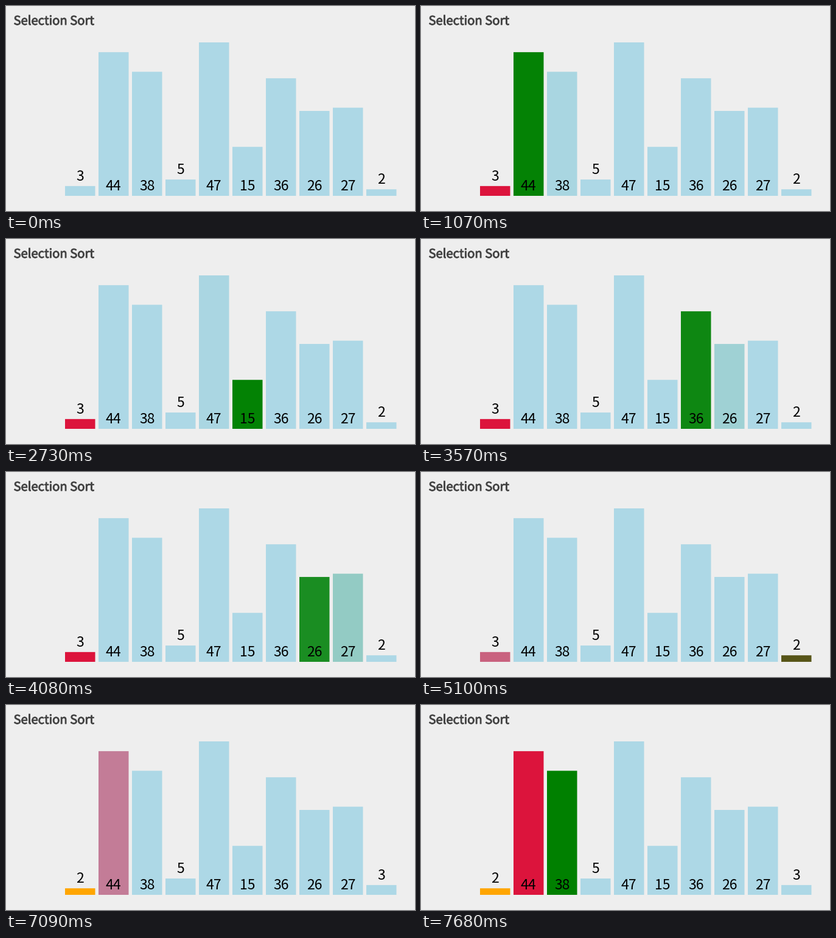
Write a matplotlib script that moves like this. It is 672 px wide and 338 px high and loops after 8 s.

```python
import math

import matplotlib.pyplot as plt
from matplotlib.animation import FuncAnimation
from matplotlib.colors import to_rgb
from matplotlib.patches import Rectangle
from matplotlib.patheffects import withStroke

W, H, DPI = 672, 338, 64
LOOP, STEP = 8000, 20
VALUES = [3, 44, 38, 5, 47, 15, 36, 26, 27, 2]
LEFT, PITCH, BAR_W, BASE = 97, 55, 49.5, 313
UNIT = 253 / 47
FONT = "Noto Sans CJK JP"

BLUE, GREEN, RED, ORANGE = map(to_rgb, ("lightblue", "green", "crimson", "orange"))

# Algorithm steps are evenly spaced and each one eases over FADE ms.
FIRST, GAP, FADE = 44, 496, 200
# The picture refreshes on a coarse clock.
TICK, PHASE = 46.26, 5

LAST = len(VALUES) - 1
SWAP = LAST + 3


def build_steps():
    """Colour changes as (step, bar, new colour)."""
    steps = [(0, 0, RED)]
    for j in range(1, LAST + 1):
        steps.append((j, j, GREEN))
        if j < LAST:
            steps.append((j + 1, j, BLUE))
    steps += [(LAST + 1, 0, BLUE), (LAST + 1, LAST, RED)]
    steps += [(LAST + 2, 0, RED)]
    steps += [(SWAP + 1, 0, BLUE), (SWAP + 1, LAST, ORANGE)]
    steps += [(SWAP + 2, 1, RED), (SWAP + 3, 2, GREEN)]
    return sorted(steps, key=lambda s: s[0])


STEPS = build_steps()


def progress(step, t):
    """Cubic ease in and out for one algorithm step."""
    p = min(max((t - FIRST - GAP * step) / FADE, 0), 1)
    return 4 * p ** 3 if p < 0.5 else 1 - 4 * (1 - p) ** 3


def mix(a, b, p):
    return tuple(u + (v - u) * p for u, v in zip(a, b))


def px(size):
    return size * 72 / DPI


fig = plt.figure(figsize=(W / DPI, H / DPI), dpi=DPI, facecolor="#eeeeee")
ax = fig.add_axes([0, 0, 1, 1])
ax.set_xlim(0, W)
ax.set_ylim(H, 0)
ax.axis("off")

ax.text(12.5, 31, "Selection Sort", family=FONT, size=px(20.2), color="#444444",
        va="baseline", path_effects=[withStroke(linewidth=px(0.9), foreground="#444444")])

bars, labels = [], []
for i, value in enumerate(VALUES):
    height = value * UNIT
    top = BASE - height
    bar = Rectangle((LEFT + PITCH * i, top), BAR_W, height, lw=0, fc=BLUE,
                    snap=False, zorder=2 * i + 2)
    bars.append(ax.add_patch(bar))
    baseline = (top if height < 40 else BASE) - 9
    labels.append(ax.text(LEFT + PITCH * i + BAR_W / 2, baseline, str(value),
                          family=FONT, size=px(23), color="black", ha="center",
                          va="baseline", zorder=2 * i + 3))


def place(i, slot):
    x = LEFT + PITCH * slot
    bars[i].set_x(x)
    labels[i].set_x(x + BAR_W / 2)


def draw(frame):
    ms = frame * STEP + STEP / 2
    t = PHASE + TICK * math.floor((ms - PHASE) / TICK) + 3
    colors = [BLUE] * len(VALUES)
    for step, i, color in STEPS:
        colors[i] = mix(colors[i], color, progress(step, t))
    for bar, color in zip(bars, colors):
        bar.set_facecolor(color)
    shift = LAST * progress(SWAP, t)
    place(0, shift)
    place(LAST, LAST - shift)
    return bars + labels


anim = FuncAnimation(fig, draw, frames=LOOP // STEP, interval=STEP,
                     repeat=True, repeat_delay=0, blit=False)
plt.show()
```
